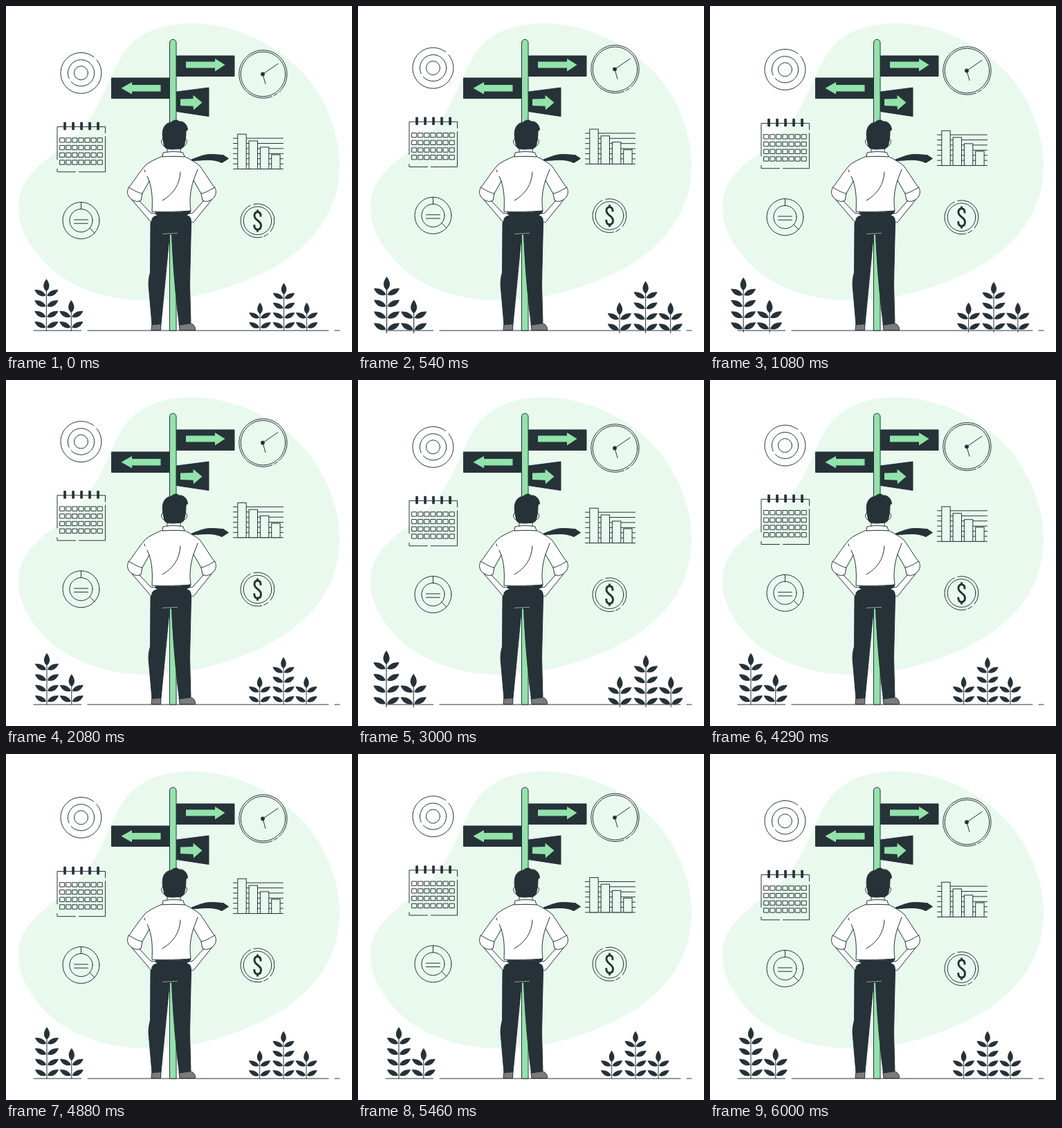
These frames come from a looping animation (500x500 px, 6040 ms). An HTML page:

```html
<!DOCTYPE html>
<html lang="en">
<head>
<meta charset="utf-8">
<title>Choosing a direction</title>
<style>
  html, body { margin: 0; width: 100%; height: 100%; overflow: hidden; background: #fff; }
  svg { display: block; width: 100%; height: 100%; }
  .line { fill: none; stroke: #263238; stroke-width: 1; stroke-linecap: round; stroke-linejoin: round; }
  .dark { fill: #263238; stroke: #263238; stroke-width: 1; stroke-linejoin: round; }
  .leaf { fill: #263238; }
  .green { fill: #92e3a9; }
  .white { fill: #fff; stroke: #263238; stroke-width: 1; stroke-linejoin: round; }
  .pale { fill: #e9f9ee; stroke: #263238; stroke-width: 1; }
  .shoe { fill: #7b7b7b; stroke: #263238; stroke-width: 1; }
</style>
</head>
<body>
<svg viewBox="0 0 500 500">
  <path fill="#e9f9ee" d="M267 25C333 25 394 57 433 101C466 139 482 190 482 230C482 298 441 347 388 377C335 406 270 425.500 207 425.500C135 425.500 84 401 53 368C29 341 18 317 18 290C18 252 46 231 75 209C100 190 119 170 133 143C150 111 159 78 179 57C201 33 237 25 267 25Z"/>

  <g id="icons"></g>
  <path class="line" d="M40 469H108.500M118 469H466M475 469H482"/>
  <g id="plants"></g>

  <g id="signpost">
    <path class="green" stroke="#263238" d="M236.500 469V53a4.750 4.750 0 0 1 9.500 0V469Z"/>
    <path class="dark" d="M246.500 72H330V101.500H246.500ZM152.500 104H236.500V133.500H152.500ZM246.500 124L293 118V159.500L246.500 152.500Z"/>
    <path class="green" d="M260 80.500H302V76L316.500 85L302 94.500V89.500H260ZM223.500 114H182V110L166.500 118.700L182 127.500V123.500H223.500ZM252 134.500L270.500 134V128.800L283.500 139.500L271 150.300L270.500 144.700L252 144Z"/>
  </g>

  <g id="man">
    <path class="dark" d="M268 222C279 218 288 213.500 300 214.500L314 215.500L321.500 220.500L312 226.500C298 220 286 223 270 223.500Z"/>
    <path class="shoe" d="M211 459L210 468.500H223.500L224 459ZM250 459L251 468.500H273.500C274 462 270 459 264 458Z"/>
    <path class="dark" d="M217 299C211 302 209 308 209 315L208.500 385C205 398 206 404 207 414L211 460.500L224 459.500C228 420 232 375 236.500 330H239.500C241 370 245 420 250.500 461L267 458.500L265.500 402L267.500 314C268 307 266 302 263 298Z"/>
    <path fill="none" stroke="#9aa0a3" d="M226 329.300L248 328.300"/>
    <path class="white" d="M181 279L206 308C208 312 211 313 211 308C213 303 217 304 219 302C216 299 211 300 209 299L193 282ZM298 279L273 310C271 314 267 314 267 308C266 303 263 304 261 302C264 299 268 300 270 299L285 282Z"/>
    <path class="white" d="M226 217C214 222 204 227 200 232C190 244 182 257 177 263C175 267 175 272 178 276C183 282 189 284 195 281L197 271L207 253C211 265 212 278 211 297C230 298 250 297 267 296C265 281 266 267 271 252L282 271L284 281C290 284 296 282 301 276C304 271 304 267 302 263C296 256 289 243 280 231C274 226 267 222 257 217Z"/>
    <path class="line" d="M207 253L204 246M271 252L277 236M177 262C182 264 189 270 197 271M302 262C297 264 290 270 282 271M200 237L201 240M252 240C251 258 242 272 226 281"/>
    <path class="dark" d="M216 298C235 299 250 299 267 296L265 300C250 302 232 302 217 301Z"/>
    <path class="white" d="M233 202V212H252V202ZM229 192C223 190 223 201 230 203ZM257 192C263 190 263 201 256 203Z"/>
    <path class="white" d="M226 218L227 212C237 210 248 210 256 212L258 218C247 217 237 217 226 218Z"/>
    <path class="dark" d="M227 194C224 178 229 169 239 168C243 164 248 164 250 167C256 166 262 171 262.500 179C261 180 260 180 260 182C260 190 259 197 257 203C253 208 249 206 243 207C236 207 231 207 229 203Z"/>
  </g>
</svg>
<script>
const LOOP = 6040, FPS = 24;
const icons = document.getElementById("icons");
const plants = document.getElementById("plants");

const line = d => `<path class="line" d="${d}"/>`;
const range = (n, fn) => Array.from({ length: n }, (_, i) => fn(i)).join("");
const ring = (x, y, r) => `<circle class="line" cx="${x}" cy="${y}" r="${r}"/>`;

// Clockwise arc, in degrees from three o'clock.
function arc(x, y, r, from, to) {
  const point = deg => {
    const a = deg * Math.PI / 180;
    return `${x + r * Math.cos(a)} ${y + r * Math.sin(a)}`;
  };
  return line(`M${point(from)}A${r} ${r} 0 ${to - from > 180 ? 1 : 0} 1 ${point(to)}`);
}

function target() {
  const x = 108.5, y = 97.1;
  return arc(x, y, 29.5, -40, 308) + arc(x, y, 19.2, -205, 138) + ring(x, y, 10);
}

function clock() {
  const x = 371.5, y = 98.8;
  return arc(x, y, 34.7, 68, 408) + arc(x, y, 34.7, 53, 63) + ring(x, y, 32.3)
    + line(`M375 112.800L371 98.800L393 83.800`)
    + `<circle class="leaf" cx="371" cy="98.800" r="2.900"/>`;
}

function calendar() {
  return line("M74 222V174.800H143.500V184M143.500 189V240H105.500M100.500 240H74V235.800")
    + range(5, i => `<rect class="leaf" x="${83.2 + 12 * i}" y="168.100" width="3.700" height="11.500" rx=".8"/>`)
    + range(28, i => `<rect class="line" x="${78 + 9.1 * (i % 7)}" y="${191 + 10.7 * Math.floor(i / 7)}" width="6.700" height="6.300"/>`);
}

function chart() {
  const base = 235.8, heights = [50.3, 40.6, 31.6, 20.6];
  return range(7, i => line(`M328.500 ${base - 7.4 * i}H400.500`))
    + range(4, i => `<rect class="pale" x="${334.8 + 16.3 * i}" y="${base - heights[i]}" width="12.400" height="${heights[i]}"/>`);
}

function pie() {
  const x = 108.5, y = 310.3;
  return ring(x, y, 26.5) + ring(x, y, 16.6)
    + line("M108.500 283.800V293.700M121 321.300L128 328.300M98.500 309.200H118.500M98.500 314.500H118.500");
}

function coin() {
  const x = 363.5, y = 310.5;
  return ring(x, y, 20.3) + arc(x, y, 24.5, 75, 245) + arc(x, y, 24.5, 257, 400) + arc(x, y, 24.5, 52, 68)
    + `<path fill="none" stroke="#263238" stroke-width="2.900" d="M368 304.800V303.300C368 299.800 366.500 298.100 363.700 298.100C360.500 298.100 359 300.300 359 303.300C359 310.300 368.500 310.300 368.500 317.300C368.500 321.300 366.500 323.300 363.500 323.300C360 323.300 358.700 321.300 358.700 316.300M363.500 294.800V298.300M363.500 323.300V326.800"/>`;
}

// Grows upwards from the ground line, with pairs of leaves below the tip.
function plant(x, size, rows) {
  const height = 13.3 + 15.3 * rows;
  const leaf = "M-1 0C-3-6-9-9-17-8.500C-14-.5-7 2.500-1 0Z";
  return `<g transform="translate(${x} 469) scale(${size})">` + line(`M0 ${15 - height}V0`)
    + `<path class="leaf" d="M0 ${-height}c-6 8-5 14 0 18c5-4 6-10 0-18Z"/>`
    + range(rows, i => {
      const y = -4.5 - 15.3 * i;
      return `<path class="leaf" transform="translate(0 ${y})" d="${leaf}"/>`
        + `<path class="leaf" transform="matrix(-1 0 0 1 0 ${y})" d="${leaf}"/>`;
    }) + "</g>";
}

icons.innerHTML = target() + clock() + calendar() + chart() + pie() + coin();
plants.innerHTML = plant(59, 1, 4) + plant(94.8, 1, 2)
  + plant(366.6, 0.92, 2) + plant(401, 0.92, 4) + plant(434, 0.92, 2);

// Two beats, each given by its start, peak and end in seconds.
function beat(s) {
  const rise = (from, peak, to) => Math.max(0, Math.min((s - from) / (peak - from), (to - s) / (to - peak)));
  return 1 + 0.1 * (rise(0, 0.6, 1.8) + rise(2.4, 3, 3.6));
}

function draw(ms) {
  const s = (Math.floor((ms + 5) * FPS / 1000) + 0.5) / FPS;
  const phase = s / 1.5 % 1;
  const lift = 10 * (1 - Math.abs(1 - 2 * phase));
  icons.setAttribute("transform", `translate(0 ${-lift})`);
  plants.setAttribute("transform", `translate(245.5 431.7) scale(${beat(s)}) translate(-245.5 -431.7)`);
}

const start = performance.now();
function tick() {
  draw((performance.now() - start) % LOOP);
  requestAnimationFrame(tick);
}
tick();
</script>
</body>
</html>
```
